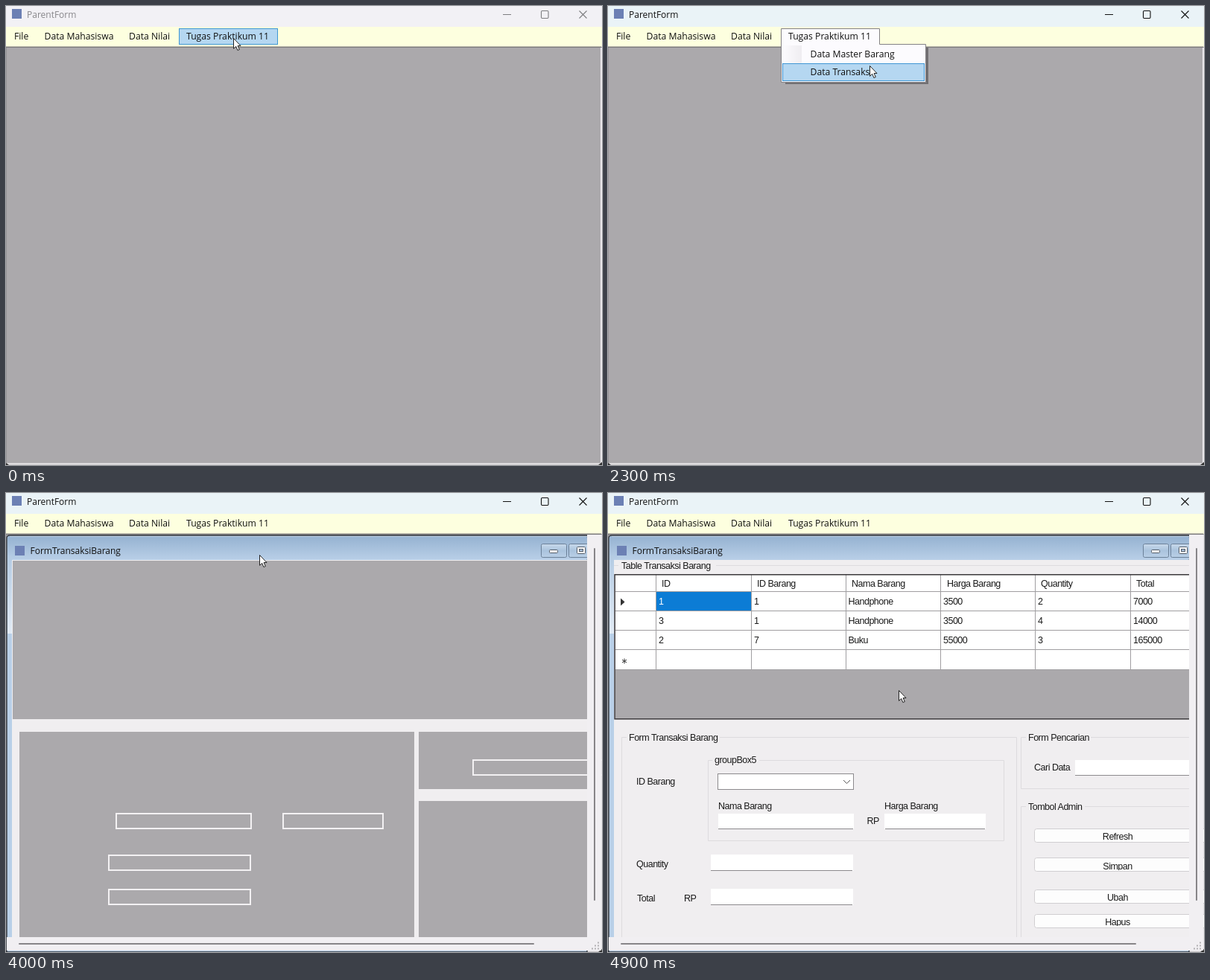
These frames come from a looping animation (800 px wide and 617 px high, 5000 ms). An HTML page:

```html
<!DOCTYPE html>
<html lang="id">
<head>
<meta charset="utf-8">
<title>ParentForm</title>
<style>
html, body { margin: 0; width: 100%; height: 100%; overflow: hidden; background: #aba9ac; }
svg.stage { display: block; width: 800px; height: 617px; }
text { white-space: pre; }
.ui { font: 12.2px "Open Sans", "Noto Sans", sans-serif; fill: #111; }
.title { font-size: 12px; }
.form { font: 12.5px "Liberation Sans", Arial, sans-serif; letter-spacing: -.5px; fill: #1a1a1a; }
.mid { text-anchor: middle; }
.line { fill: none; stroke: #a09ea1; }
.group { fill: none; stroke: #dddbde; }
.hot { fill: #b5d7f1; stroke: #3f96d4; }
.ctl { fill: none; stroke-width: 1.1; }
.field { fill: #fff; }
.base { stroke: #8c8a8d; }
.btn { fill: #fdfdfd; stroke: #d0ced1; }

.layer, #cursor { animation: 5s step-end infinite; }
#active { animation-name: active; }
#hover { animation-name: hover; }
#menu { animation-name: menu; }
#item1 { animation-name: item1; }
#item2 { animation-name: item2; }
#child { animation-name: child; }
#blank { animation-name: blank; }
#content { animation-name: content; }
#late { animation-name: late; }
#cursor { animation-name: move; }

@keyframes active { 0% { opacity: 0 } 12% { opacity: .5 } 14%, 100% { opacity: 1 } }
@keyframes hover { 0% { opacity: 1 } 28%, 100% { opacity: 0 } }
@keyframes menu { 0% { opacity: 0 } 28% { opacity: 1 } 76%, 100% { opacity: 0 } }
@keyframes item1 { 0% { opacity: 0 } 38% { opacity: 1 } 42%, 100% { opacity: 0 } }
@keyframes item2 { 0% { opacity: 0 } 42%, 100% { opacity: 1 } }
@keyframes child { 0% { opacity: 0 } 80%, 100% { opacity: 1 } }
@keyframes blank { 0% { opacity: 1 } 82%, 100% { opacity: 0 } }
@keyframes content { 0% { opacity: 0 } 82%, 100% { opacity: 1 } }
@keyframes late { 0% { opacity: 0 } 84%, 100% { opacity: 1 } }
@keyframes move {
  0% { transform: translate(305px, 43px) }
  12% { transform: translate(305px, 43px); animation-timing-function: steps(6) }
  24% { transform: translate(318px, 44px); animation-timing-function: steps(4) }
  32% { transform: translate(319px, 45px) }
  36% { transform: translate(319px, 45px); animation-timing-function: steps(4) }
  44% { transform: translate(350px, 90px) }
  46% { transform: translate(351px, 80px) }
  60% { transform: translate(351px, 80px); animation-timing-function: steps(4) }
  68% { transform: translate(340px, 83px) }
  82% { transform: translate(404px, 98px); animation-timing-function: steps(3) }
  88% { transform: translate(412px, 190px); animation-timing-function: steps(4) }
  96%, 100% { transform: translate(390px, 265px) }
}
</style>
</head>
<body>
<svg class="stage" viewBox="0 0 800 617" xmlns="http://www.w3.org/2000/svg">
  <defs>
    <linearGradient id="caption" x2="0" y2="1">
      <stop stop-color="#95b2d1"/><stop offset="1" stop-color="#bad0e8"/>
    </linearGradient>
    <linearGradient id="edge" x2="0" y2="1">
      <stop stop-color="#b4cbe3"/><stop offset="1" stop-color="#e2ebf5"/>
    </linearGradient>
    <linearGradient id="key" x2="0" y2="1">
      <stop stop-color="#c8d9eb"/><stop offset=".5" stop-color="#aac3dd"/><stop offset="1" stop-color="#b9cfe6"/>
    </linearGradient>
    <linearGradient id="margin">
      <stop stop-color="#fcfbfe"/><stop offset="1" stop-color="#efedf1"/>
    </linearGradient>
    <g id="controls" class="ctl">
      <path d="M667 11.5H678M769.5 6.5l10 10M779.5 6.5l-10 10"/>
      <rect x="718.5" y="6.5" width="9.5" height="10" rx="1.2"/>
    </g>
  </defs>

  <!-- window -->
  <rect width="800" height="617" fill="#aba9ac"/>
  <path d="M799 56V615.5H0" fill="none" stroke="#ebe9ec" stroke-width="2"/>
  <path d="M.5 56V614" stroke="#979598"/>
  <path d="M0 614v3h4zM800 613v4h-5z" fill="#333"/>
  <rect width="800" height="28" fill="#f2f1f5"/>
  <use href="#controls" stroke="#7d7d80"/>
  <text class="ui title" x="28" y="15.5" style="fill:#88878b">ParentForm</text>
  <g id="active" class="layer">
    <rect width="800" height="28" fill="#eaf3f7"/>
    <use href="#controls" stroke="#111"/>
    <text class="ui title" x="28" y="15.5">ParentForm</text>
  </g>
  <rect x="8" y="4" width="13" height="13" fill="#6c80b4"/>
  <rect y="28" width="800" height="27" fill="#fdffdf"/>
  <path d="M0 55.3H799" stroke="#7b797c" stroke-width="1.6"/>

  <!-- child window -->
  <g id="child" class="layer">
    <path d="M1 617V61q0-4 4-4H780V617z" fill="#b9d0e8" stroke="#33383f" stroke-width="1.4"/>
    <rect x="2" y="58" width="778" height="33" rx="3" fill="url(#caption)"/>
    <path d="M5 58.5H780" stroke="#bfd2e6"/>
    <rect x="2" y="84" width="6" height="105" fill="url(#edge)"/>
    <rect x="8" y="90" width="772" height="510" fill="#f0eef0"/>
    <rect x="12" y="71" width="13" height="13" fill="#6c80b4"/>
    <text class="ui title" x="32.5" y="82">FormTransaksiBarang</text>
    <g fill="url(#key)" stroke="#6c8199">
      <rect x="718.5" y="68.5" width="34" height="18" rx="2"/>
      <rect x="755.5" y="68.5" width="34" height="18" rx="2"/>
    </g>
    <g fill="#fff" stroke="#525c68">
      <rect x="729.5" y="76.5" width="11" height="4" rx="1"/>
      <rect x="766.5" y="72.5" width="11" height="9" rx="1"/>
      <rect x="769.5" y="75.5" width="5" height="3" fill="#a9c0da"/>
    </g>

    <g id="blank" class="layer">
      <path d="M9 91H780V304H9zM18 321H548V600H18zM554 321H780V398H554zM554 414H780V600H554z" fill="#aba9ac"/>
      <g fill="none" stroke="#f3f1f3" stroke-width="2">
        <rect x="148" y="431" width="181" height="20"/>
        <rect x="372" y="431" width="134" height="20"/>
        <rect x="138" y="487" width="190" height="20"/>
        <rect x="138" y="533" width="190" height="20"/>
        <rect x="627" y="359" width="180" height="20"/>
      </g>
    </g>

    <g id="content" class="layer form">
      <path class="group" d="M8 97.5H14M145 97.5H780"/>
      <text x="18" y="102">Table Transaksi Barang</text>

      <!-- data grid -->
      <rect x="9" y="109" width="771" height="195" fill="#aba9ac"/>
      <path class="field" d="M10 110H780V211H573V237H10z"/>
      <path class="line" d="M9.5 304V109.5H780M10 132.5H780M10 158.5H780M10 184.5H780M10 210.5H780M10 237.5H573M64.5 110V237M192.5 110V237M319.5 110V237M446.5 110V237M573.5 110V237M701.5 110V237"/>
      <rect x="65" y="133" width="127" height="25" fill="#0c7cd5"/>
      <path d="M17 141.5l5.5 5-5.5 5z" fill="#333"/>
      <path d="M22 222.5v7M19 224.2l6 3.6M25 224.2l-6 3.6" stroke="#333"/>
      <g id="late" class="layer">
        <path class="field" d="M574 211H780V237H574z"/>
        <path class="line" d="M573.5 211V237.5H780M701.5 211V237"/>
        <path d="M780 109.8H9V303.8H780" fill="none" stroke="#3a383b" stroke-width="1.4"/>
      </g>
      <text y="126"><tspan x="72">ID</tspan><tspan x="200">ID Barang</tspan><tspan x="327">Nama Barang</tspan><tspan x="455">Harga Barang</tspan><tspan x="581">Quantity</tspan><tspan x="709">Total</tspan></text>
      <text y="150"><tspan x="68" fill="#fff">1</tspan><tspan x="196">1</tspan><tspan x="322.5">Handphone</tspan><tspan x="450">3500</tspan><tspan x="577">2</tspan><tspan x="705">7000</tspan></text>
      <text y="176"><tspan x="68">3</tspan><tspan x="196">1</tspan><tspan x="322.5">Handphone</tspan><tspan x="450">3500</tspan><tspan x="577">4</tspan><tspan x="705">14000</tspan></text>
      <text y="202"><tspan x="68">2</tspan><tspan x="196">7</tspan><tspan x="322.5">Buku</tspan><tspan x="450">55000</tspan><tspan x="577">3</tspan><tspan x="705">165000</tspan></text>

      <!-- group boxes -->
      <path class="group" d="M25 328.5H18.5V600M150 328.5H548.5V600M140 359.5H134.5V467.5H531.5V359.5H203M561 328.5H554.5V397.5H780M648 328.5H780M561 421.5H554.5V600M640 421.5H780"/>
      <text x="28" y="333">Form Transaksi Barang</text>
      <text x="143" y="363">groupBox5</text>
      <text x="564" y="333">Form Pencarian</text>
      <text x="564" y="426">Tombol Admin</text>

      <!-- inputs -->
      <text x="38" y="392">ID Barang</text>
      <text x="148" y="425">Nama Barang</text>
      <text x="371" y="425">Harga Barang</text>
      <text x="347.5" y="445">RP</text>
      <text x="38" y="503">Quantity</text>
      <text x="39" y="549">Total</text>
      <text x="102" y="549">RP</text>
      <text x="572" y="373">Cari Data</text>
      <rect class="field base" x="147.5" y="377.5" width="182" height="21"/>
      <path d="M316 386l4.5 4.5 4.5-4.5" fill="none" stroke="#555"/>
      <path class="field" d="M148 431H330V452H148zM371 431H507V452H371zM138 486H329V508H138zM138 532H329V554H138zM627 359H780V380H627z"/>
      <path class="base" d="M148 451.5H329M372 451.5H506M138 507.5H328M138 553.5H328M627 379.5H780"/>

      <!-- buttons -->
      <g class="btn">
        <rect x="572.5" y="451.5" width="240" height="18" rx="3"/>
        <rect x="572.5" y="490.5" width="240" height="18" rx="3"/>
        <rect x="572.5" y="533.5" width="240" height="18" rx="3"/>
        <rect x="572.5" y="566.5" width="240" height="18" rx="3"/>
      </g>
      <g class="mid">
        <svg x="573" y="451" width="207" height="17"><text x="111" y="15">Refresh</text></svg>
        <svg x="573" y="490" width="207" height="17"><text x="111" y="15.5">Simpan</text></svg>
        <svg x="573" y="533" width="207" height="17"><text x="111" y="15">Ubah</text></svg>
        <svg x="573" y="566" width="207" height="16"><text x="111" y="15">Hapus</text></svg>
      </g>
    </g>

    <!-- scroll bars -->
    <path d="M780 56H799V615H1V597H780z" fill="#f1eff2"/>
    <path d="M790 75V547M18 606H708" stroke="#878588" stroke-width="2" stroke-linecap="round"/>
    <path d="M794 604.5h2M790 608.5h2m2 0h2M786 612.5h2m2 0h2m2 0h2" stroke="#b3b1b4" stroke-width="2"/>
  </g>

  <!-- menu -->
  <rect id="hover" class="layer hot" x="232.5" y="30.5" width="132" height="21"/>
  <g id="menu" class="layer">
    <path d="M427 56h3v49H238v-2H427z" fill="#5e5c5f" opacity=".75"/>
    <path d="M232.5 102.5V30.5H364.5V51.5H426.5V102.5z" fill="#fcfbfe" stroke="#838185"/>
    <rect x="234" y="53" width="26" height="48" fill="url(#margin)"/>
    <rect id="item1" class="layer hot" x="234.5" y="53.5" width="190" height="23"/>
    <rect id="item2" class="layer hot" x="234.5" y="77.5" width="190" height="23"/>
    <text class="ui" x="271.5" y="69">Data Master Barang</text>
    <text class="ui" x="271.5" y="93">Data Transaksi</text>
  </g>
  <g class="ui">
    <text x="11" y="45">File</text>
    <text x="51.5" y="45">Data Mahasiswa</text>
    <text x="165" y="45">Data Nilai</text>
    <text x="242" y="45">Tugas Praktikum 11</text>
  </g>

  <path id="cursor" d="M.5.5V14.3L3.7 11.3 5.9 16.5 8.3 15.5 6.1 10.5H10z" fill="#fff" stroke="#222"/>
</svg>
</body>
</html>
```
